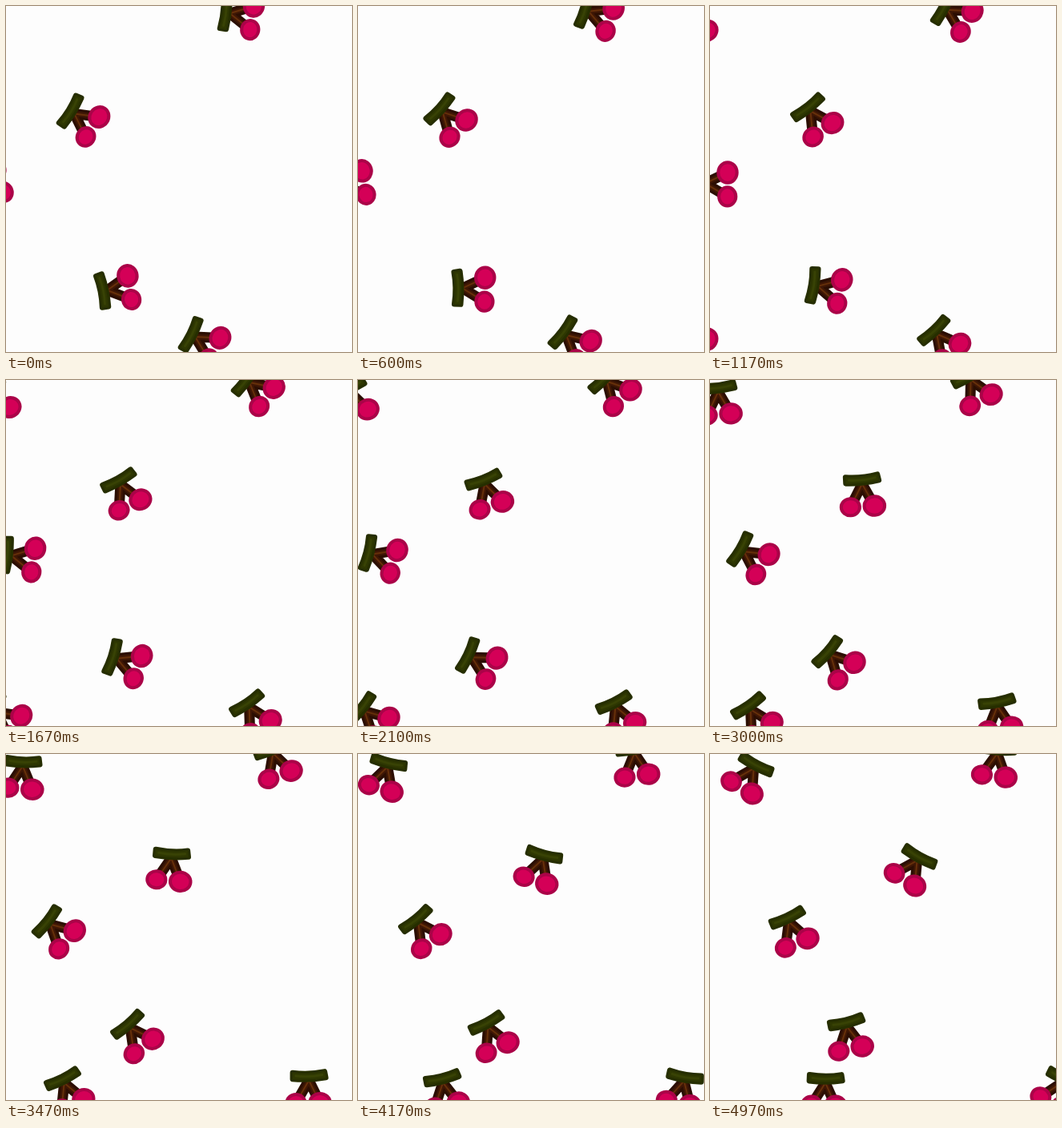
An HTML page for the animation above (5.01 s loop, 432 by 432 pixels).

```html
<!DOCTYPE html>
<html lang="en">
<head>
<meta charset="utf-8">
<title>Drifting cherries</title>
<style>
  html, body { margin: 0; width: 100%; height: 100%; overflow: hidden; background: #fdfdfd; }
  svg { display: block; width: 100%; height: 100%; }
</style>
</head>
<body>
<svg id="stage" viewBox="0 0 432 432">
  <defs>
    <path id="stems" d="M-13.8 13.6L2.3 -14.5L16.2 13.6"/>
    <g id="cherry" stroke-linejoin="round" stroke-linecap="round" fill="none">
      <use href="#stems" stroke="#2b0e02" stroke-width="13"/>
      <use href="#stems" stroke="#3f1705" stroke-width="6.5"/>
      <use href="#stems" stroke="#66300a" stroke-width="2"/>
      <path d="M-18 -24Q3 -21.5 22 -25.6L23.5 -18Q3 -14.3 -18 -16Z" fill="#2e3702" stroke="#262e00" stroke-width="6.5" paint-order="stroke"/>
      <path d="M-14 -20Q3 -18 19 -21.5" stroke="#384205" stroke-width="3"/>
      <g fill="#d40057" stroke="#aa0348" stroke-width="4">
        <ellipse cx="-13.8" cy="13.6" rx="11.6" ry="10.6"/>
        <ellipse cx="16.2" cy="13.6" rx="12.8" ry="11.7"/>
      </g>
    </g>
  </defs>
</svg>
<script>
const LOOP = 5010, STEPS = 150, FPS = 30;
const DRIFT = 6.16; // px per second; each sprite drifts one unit faster than the last
const SPIN = 17.6;  // degrees per second, shared by all

// Start poses: x, y, angle
const poses = [
  [141, 355, -99],
  [293.5, 13.8, -81],
  [-46.5, 29.5, -57],
  [-20.5, 224, -110],
  [96, 144.4, -56],
  [247.7, 422, -61],
  [-73, 425, -85]
];

const stage = document.getElementById("stage");
const sprites = poses.map(() => {
  const node = document.createElementNS("http://www.w3.org/2000/svg", "use");
  node.setAttribute("href", "#cherry");
  return stage.appendChild(node);
});

// Steps of 1/30 s, with their starts rounded to 10 ms
function stepAt(ms) {
  const tick = Math.floor(ms / 10) * 10;
  return Math.min(STEPS - 1, Math.floor((tick + 4) * FPS / 1000));
}

function draw(ms) {
  const t = stepAt(ms) / FPS;
  sprites.forEach((node, i) => {
    const [x, y, angle] = poses[i];
    const px = x + DRIFT * (i + 1) * t;
    node.setAttribute("transform", `translate(${px} ${y}) rotate(${angle + SPIN * t})`);
  });
}

const start = performance.now();
function loop() {
  draw((performance.now() - start) % LOOP);
  requestAnimationFrame(loop);
}
loop();
</script>
</body>
</html>
```
